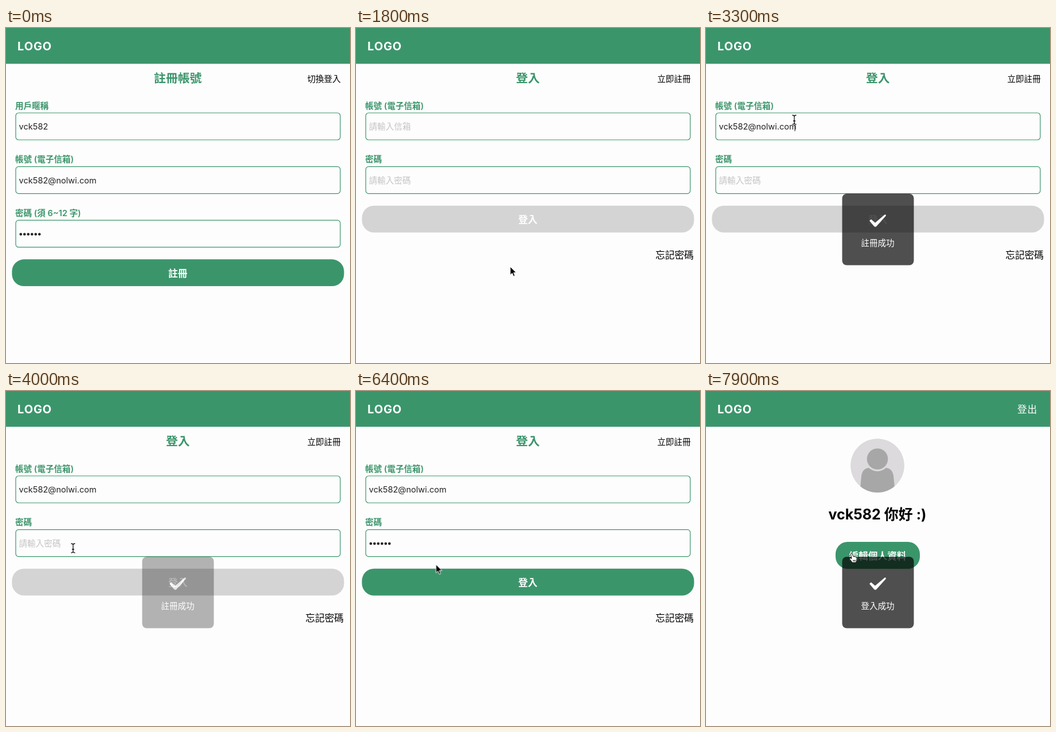
Write an HTML page that moves like this. It is 600 px wide and 584 px high and loops after 8000 ms.

```html
<!DOCTYPE html>
<html lang="zh-Hant">
<head>
<meta charset="utf-8">
<title>登入流程</title>
<style>
html, body { margin: 0; width: 100%; height: 100%; overflow: hidden; background: #fdfdfd; }
svg { display: block; width: 100vw; height: 100vh; }
text { font: 14.6px Inter, "Noto Sans CJK TC", "Noto Sans CJK", sans-serif; fill: #000; }
.brand { font-size: 20px; font-weight: 700; letter-spacing: .9px; fill: #fff; }
.title { font-size: 20.8px; font-weight: 700; fill: #3b956b; text-anchor: middle; }
.label { font-weight: 600; fill: #3b956b; }
.value { fill: #222; }
.hint { fill: #c4c4c4; }
.link { font-size: 16.7px; }
.action { font-size: 16.7px; font-weight: 600; fill: #fff; text-anchor: middle; }
.greeting { font-size: 25px; font-weight: 700; text-anchor: middle; }
.note { fill: #fff; text-anchor: middle; }
.field { fill: none; stroke: #3b956b; stroke-width: 1.2; }
.green { fill: #3b956b; }
.grey { fill: #d4d4d4; }
.caret { stroke: #222; stroke-width: 1.1; }

/* One loop is 8 s, so 1.25% is 100 ms. */
.anim { animation: 8s -10ms step-end infinite; }
.hidden { visibility: hidden; }
.register { animation-name: register; }
.login { animation-name: login; }
.profile { animation-name: profile; }
.mailHint { animation-name: mailHint; }
.mailText { animation-name: mailText; }
.mailCaret { animation-name: mailCaret; }
.passHint { animation-name: passHint; }
.passDots { animation-name: passDots; }
.passMove { animation-name: passMove; }
.passCaret { animation-name: passCaret; }
.ready { animation-name: ready; }
.toast { opacity: 0; }
.toastRegister { animation-name: toastRegister; }
.toastLogin { animation-name: toastLogin; }
.pointer { animation-name: pointer; }
.arrow { animation-name: arrow; }
.beam { animation-name: beam; }
.hand { animation-name: hand; }

@keyframes register { 0% { visibility: visible } 21.25% { visibility: hidden } }
@keyframes login { 21.25% { visibility: visible } 87.5% { visibility: hidden } }
@keyframes profile { 87.5%, 100% { visibility: visible } }
@keyframes mailHint { 21.25% { visibility: visible } 36.25% { visibility: hidden } }
@keyframes mailText { 36.25% { visibility: visible } 87.5% { visibility: hidden } }
@keyframes mailCaret { 36.25% { visibility: visible } 47.5% { visibility: hidden } }
@keyframes passHint { 21.25% { visibility: visible } 61.25% { visibility: hidden } }
@keyframes passDots { 61.25% { visibility: visible } 87.5% { visibility: hidden } }
@keyframes passMove {
  0% { transform: translateX(0) }
  61.25% { transform: translateX(6.5px) }
  63.75% { transform: translateX(13px) }
  65% { transform: translateX(19.5px) }
  67.5% { transform: translateX(26px) }
  70% { transform: translateX(32.5px) }
  71.25%, 100% { transform: translateX(39px) }
}
@keyframes passCaret {
  53.75%, 61.25%, 83.75% { visibility: visible }
  60%, 77.5%, 87.5% { visibility: hidden }
}
@keyframes ready { 71.25% { visibility: visible } 87.5% { visibility: hidden } }
@keyframes toastRegister {
  23.75% { opacity: .5 } 25% { opacity: .9 } 26.25% { opacity: 1 }
  48.75% { opacity: .9 } 50% { opacity: .43 } 51.25% { opacity: 0 }
}
@keyframes toastLogin {
  88.75% { opacity: .5 } 90% { opacity: .9 } 91.25%, 100% { opacity: 1 }
}
@keyframes pointer {
  0%, 1.25% { transform: translate(330px, 527px); animation-timing-function: steps(6) }
  8.75% { transform: translate(300px, 443px); animation-timing-function: steps(8) }
  18.75%, 22.5% { transform: translate(269px, 416px); animation-timing-function: steps(7) }
  31.25% { transform: translate(210px, 190px); animation-timing-function: steps(6) }
  38.75%, 41.25% { transform: translate(154px, 160px); animation-timing-function: steps(7) }
  50%, 76.25% { transform: translate(117px, 274px); animation-timing-function: steps(6) }
  83.75%, 88.75% { transform: translate(162px, 331px); animation-timing-function: steps(8) }
  98.75%, 100% { transform: translate(255px, 283px) }
}
@keyframes arrow {
  1.25%, 21.25%, 78.75%, 87.5% { visibility: visible }
  8.75%, 27.5%, 81.25%, 97.5%, 100% { visibility: hidden }
}
@keyframes beam {
  27.5%, 76.25% { visibility: visible }
  60%, 78.75% { visibility: hidden }
}
@keyframes hand {
  8.75%, 81.25%, 97.5%, 100% { visibility: visible }
  21.25%, 87.5% { visibility: hidden }
}
</style>
</head>
<body>
<svg viewBox="0 0 600 584" preserveAspectRatio="none">
  <defs>
    <rect id="field" class="field" x="17" y="148" width="566" height="47" rx="5"/>
    <rect id="button" x="10.4" width="579.2" height="46.8" rx="21"/>
    <path id="dots" d="M25.8 0H59" fill="none" stroke="#222" stroke-width="4.7" stroke-linecap="round" stroke-dasharray="0 6.5"/>
    <g id="toast">
      <rect x="237.5" y="289" width="125" height="124.5" rx="8" opacity=".69"/>
      <path fill="#fff" d="M285 336L288 333.5 295 339.5 311.5 325.5Q314.5 324.5 313.7 327.5L297 346Q295 347.5 293 345.5Z"/>
    </g>
    <clipPath id="round"><circle cx="299" cy="130" r="47"/></clipPath>
  </defs>

  <rect width="600" height="584" fill="#fdfdfd"/>
  <rect class="green" width="600" height="62.4"/>
  <text class="brand" x="20" y="38.5">LOGO</text>

  <g class="anim hidden register">
    <text class="title" x="299.7" y="95">註冊帳號</text>
    <text x="525.4" y="93.5">切換登入</text>
    <text class="label" x="16" y="140.5">用戶暱稱</text>
    <use href="#field"/>
    <text class="value" x="22.5" y="177">vck582</text>
    <text class="label" x="16" y="234">帳號 (電子信箱)</text>
    <use href="#field" y="93.6"/>
    <text class="value" x="22.5" y="270.5">vck582@nolwi.com</text>
    <text class="label" x="16" y="327.5">密碼 (須 6~12 字)</text>
    <use href="#field" y="187.2"/>
    <use href="#dots" y="359.5"/>
    <use href="#button" class="green" y="403.3"/>
    <text class="action" x="299.7" y="433.5">註冊</text>
  </g>

  <g class="anim hidden login">
    <text class="title" x="299.7" y="95">登入</text>
    <text x="525.4" y="93.5">立即註冊</text>
    <text class="label" x="16" y="140.5">帳號 (電子信箱)</text>
    <use href="#field"/>
    <text class="label" x="16" y="234">密碼</text>
    <use href="#field" y="93.6"/>
    <use href="#button" class="grey" y="309.7"/>
    <text class="link" x="522.3" y="401.5">忘記密碼</text>
  </g>
  <text class="hint anim hidden mailHint" x="22.5" y="177">請輸入信箱</text>
  <text class="value anim hidden mailText" x="22.5" y="177">vck582@nolwi.com</text>
  <path class="caret anim hidden mailCaret" d="M155 163V180"/>
  <text class="hint anim hidden passHint" x="22.5" y="270.5">請輸入密碼</text>
  <g class="anim hidden passDots">
    <use href="#dots" y="266"/>
    <rect class="anim passMove" x="22.6" y="258" width="42" height="16" fill="#fdfdfd"/>
  </g>
  <g class="anim passMove">
    <path class="caret anim hidden passCaret" d="M23 256V273.5"/>
  </g>
  <use href="#button" class="green anim hidden ready" y="309.7"/>
  <g class="anim hidden login">
    <text class="action" x="299.7" y="340">登入</text>
  </g>

  <g class="anim hidden profile">
    <text class="link" x="543" y="37.5" style="fill:#fff;letter-spacing:.8px">登出</text>
    <g clip-path="url(#round)">
      <circle cx="299" cy="130" r="47" fill="#dcdadc"/>
      <path fill="#a7a7a7" d="M268 180L271 148Q273 135 284 134H314Q325 135 327 148L330 180Z"/>
      <circle cx="299" cy="118.5" r="21.5" fill="#dcdadc"/>
      <circle cx="299" cy="118.5" r="18.3" fill="#a7a7a7"/>
    </g>
    <text class="greeting" x="299" y="224">vck582 你好 :)</text>
    <rect class="green" x="226" y="263" width="147" height="47" rx="21"/>
    <text class="action" x="299.5" y="293.5">編輯個人資料</text>
  </g>

  <g class="anim toast toastRegister">
    <use href="#toast"/>
    <text class="note" x="299.5" y="379.5">註冊成功</text>
  </g>
  <g class="anim toast toastLogin">
    <use href="#toast"/>
    <text class="note" x="299.5" y="379.5">登入成功</text>
  </g>

  <g class="anim pointer">
    <path class="anim hidden arrow" d="M0 0V14.5L3.4 11.4 5.8 17 8.2 16 5.9 10.6H10.4Z" stroke="#fff" stroke-width="1"/>
    <g class="anim hidden beam" fill="none">
      <path id="ibeam" d="M-3.5 -8Q0 -8 0 -5.5Q0 -8 3.5 -8M0 -6V6M-3.5 8Q0 8 0 5.5Q0 8 3.5 8M-2 2H2" stroke="#fff" stroke-width="2.6"/>
      <use href="#ibeam"/>
      <path d="M-3.5 -8Q0 -8 0 -5.5Q0 -8 3.5 -8M0 -6V6M-3.5 8Q0 8 0 5.5Q0 8 3.5 8M-2 2H2" stroke="#111" stroke-width="1.3"/>
    </g>
    <path class="anim hidden hand" fill="#fff" stroke="#111" stroke-width="1" stroke-linejoin="round"
      d="M-2.5 1Q-1 -1.2 .6 1L1.7 5.5Q3.2 4.6 4 6Q5.6 5.2 6.3 6.8Q8 6.3 8.2 8.5Q8.3 12 6.7 16H-.2Q-1 13.5 -4.5 10Q-5 7.6 -2.8 8.2L-1 9.5ZM1.8 11.5V14M3.6 11.5V14M5.4 11.5V14"/>
  </g>
</svg>
</body>
</html>
```
